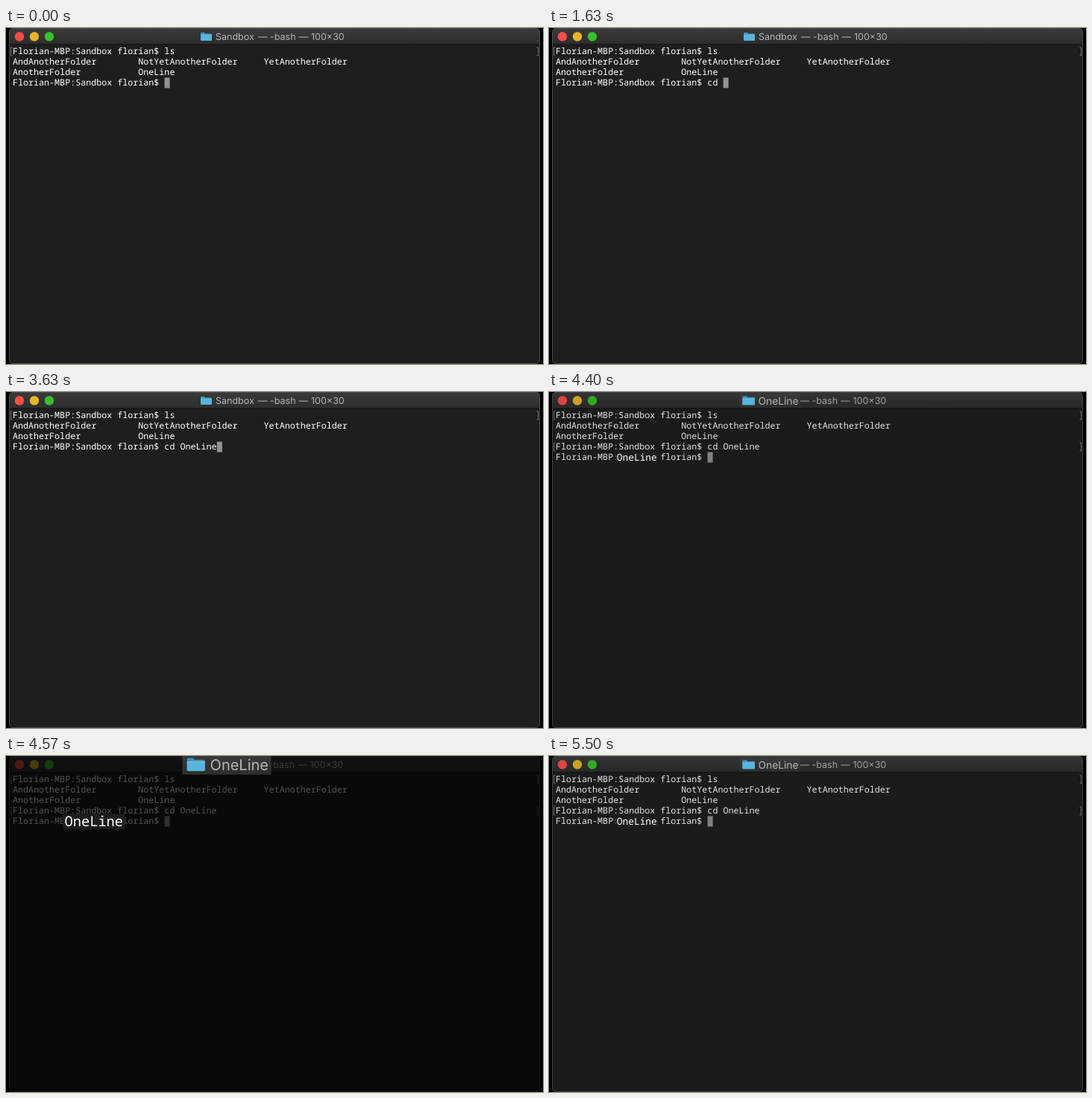
These frames come from a looping animation (720x450 px, 5530 ms). An HTML page:

```html
<!DOCTYPE html>
<html lang="en">
<head>
<meta charset="utf-8">
<title>Terminal</title>
<style>
  html, body { margin: 0; width: 100%; height: 100%; overflow: hidden; background: #000; }
  svg { display: block; width: 720px; height: 450px; }
  text { white-space: pre; text-rendering: geometricPrecision; }
  .mono { font: 500 11.7px "Noto Sans Mono", "DejaVu Sans Mono", monospace; fill: #fff; }
  .title { font: 400 12.5px Inter, Roboto, sans-serif; fill: #b6b6b6; }
  .mark { fill: none; stroke: #777; stroke-width: 1; }
</style>
</head>
<body>
<svg viewBox="0 0 720 450">
  <defs>
    <linearGradient id="bar" x1="0" y1="0" x2="0" y2="1">
      <stop offset="0" stop-color="#3a3a3a"/>
      <stop offset="1" stop-color="#2d2d2d"/>
    </linearGradient>
    <clipPath id="frame"><rect x="4.5" y="0" width="711" height="449.5" rx="5"/></clipPath>
    <g id="folder">
      <path d="M0 1.2Q0 0 1.2 0H5L6.4 1.4H13.8Q15 1.4 15 2.6V10.2H0Z" fill="#3b93b8"/>
      <path d="M0 3.2H15V10Q15 11 14 11H1Q0 11 0 10Z" fill="#58b4dc"/>
      <path d="M0 3.2H15" stroke="#86cdea" stroke-width=".6"/>
    </g>
    <path id="marks" class="mark" d="M8.5-5.5H6.5V5.5H8.5M711.5-5.5H713.5V5.5H711.5"/>
  </defs>

  <g clip-path="url(#frame)">
    <rect width="720" height="450" fill="#1e1e1e"/>
    <rect width="720" height="22" fill="url(#bar)"/>
    <rect y="21.5" width="720" height="1" fill="#111"/>
    <circle cx="18" cy="11.5" r="6.2" fill="#fc4d49"/>
    <circle cx="38" cy="11.5" r="6.2" fill="#e6b52c"/>
    <circle cx="58" cy="11.5" r="6.2" fill="#39c02b"/>

    <use id="icon" href="#folder" y="6"/>
    <text id="dir" class="title" y="16.3"></text>
    <g id="rest" class="title">
      <text x="338" y="16.3">—</text>
      <text x="354" y="16.3">-bash</text>
      <text x="392.5" y="16.3">—</text>
      <text x="409" y="16.3">100×30</text>
    </g>

    <use href="#marks" y="31.5"/>
    <use id="sent" href="#marks" y="73.5"/>
    <g id="lines" class="mono"></g>
    <rect id="cursor" width="7" height="14" fill="#939393"/>
  </g>
  <rect x="4.5" y=".5" width="711" height="449" rx="5" fill="none" stroke="#4c4c4c"/>
  <rect id="dim" width="720" height="450" fill="#000"/>

  <g id="zoomTitle">
    <rect x="-37.2" y="-8.4" width="74.4" height="16.8" fill="url(#bar)"/>
    <use href="#folder" x="-33.3" y="-5.5"/>
    <text class="title" x="-14" y="4.8">OneLine</text>
  </g>
  <g id="zoomPath">
    <rect x="-25.8" y="-6.4" width="51.6" height="12.8" fill="#1e1e1e"/>
    <text class="mono" x="-24.57" y="3.6">OneLine</text>
  </g>
</svg>
<script>
const LOOP = 5530, CHAR = 7.02, LEFT = 9, LINE = 14, BASE = 35;
const $ = id => document.getElementById(id);
const prompt = dir => `Florian-MBP:${dir} florian$ `;
const command = "cd OneLine";

// Moment each character of the command appears
const keys = [370, 670, 1630, 2230, 2770, 2900, 3270, 3390, 3510, 3630];
const ENTER = 3900, READY = 3930;
// Zoom level from each moment on; one level adds a tenth to the scale
const zoom = [
  [4400, 1], [4430, 2], [4470, 3], [4500, 4], [4530, 5], [4570, 6],
  [5370, 5], [5400, 4], [5430, 3], [5470, 2], [5500, 1]
];

const rows = Array.from({ length: 5 }, (_, i) => {
  const row = document.createElementNS("http://www.w3.org/2000/svg", "text");
  row.setAttribute("x", LEFT);
  row.setAttribute("y", BASE + i * LINE);
  return $("lines").appendChild(row);
});
const columns = (...names) => names.map(name => name.padEnd(24)).join("");
rows[0].textContent = prompt("Sandbox") + "ls";
rows[1].textContent = columns("AndAnotherFolder", "NotYetAnotherFolder", "YetAnotherFolder");
rows[2].textContent = columns("AnotherFolder", "OneLine");

const show = (id, on) => $(id).setAttribute("visibility", on ? "visible" : "hidden");

function draw(t) {
  const typed = keys.filter(k => t >= k).length;
  const entered = t >= ENTER, ready = t >= READY;
  rows[3].textContent = prompt("Sandbox") + command.slice(0, typed);
  rows[4].textContent = ready ? prompt("OneLine") : "";

  const line = entered ? 4 : 3;
  const column = entered && !ready ? 0 : rows[line].textContent.length;
  $("cursor").setAttribute("x", LEFT + column * CHAR);
  $("cursor").setAttribute("y", 24.5 + line * LINE);
  show("sent", entered);

  $("dir").textContent = ready ? "OneLine" : "Sandbox";
  $("dir").setAttribute("x", ready ? 282 : 281);
  $("icon").setAttribute("x", ready ? 262.7 : 261);
  $("rest").setAttribute("transform", `translate(${ready ? -1.5 : 0})`);

  const level = zoom.reduce((now, [at, n]) => t >= at ? n : now, 0);
  const scale = 1 + level / 10;
  $("dim").setAttribute("opacity", level * 0.114);
  $("zoomTitle").setAttribute("transform", `translate(296 11.5) scale(${scale})`);
  $("zoomPath").setAttribute("transform", `translate(117.8 87.8) scale(${scale})`);
  show("zoomTitle", level);
  show("zoomPath", level);
}

const start = performance.now();
function tick() {
  draw((performance.now() - start) % LOOP);
  requestAnimationFrame(tick);
}
draw(0);
requestAnimationFrame(tick);
</script>
</body>
</html>
```
